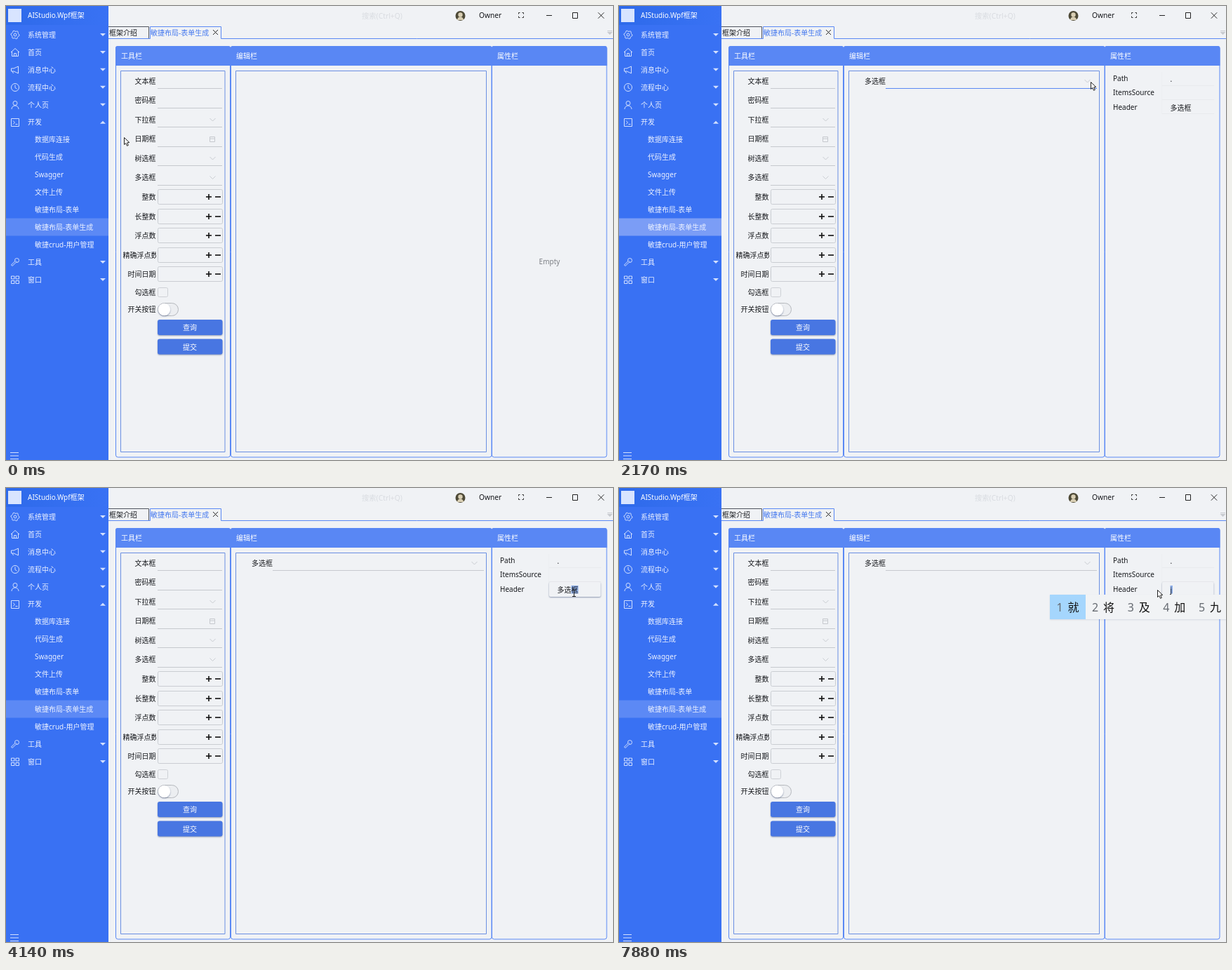
These frames come from a looping animation (865x647 px, 8000 ms). An HTML page with a canvas:

```html
<!DOCTYPE html>
<html lang="zh">
<head>
<meta charset="utf-8">
<title>表单生成</title>
<style>
html, body { margin: 0; width: 100%; height: 100%; overflow: hidden; background: #f0f2f5; }
canvas { display: block; }
</style>
</head>
<body>
<canvas id="stage" width="865" height="647"></canvas>
<script>
const g = document.getElementById('stage').getContext('2d');
const LOOP = 8000, STEP = 77.5;
const BG = '#f0f2f5', BLUE = '#5a88f4', FRAME = '#6a8fe2', PALE = '#d3e0fe', GREY = '#c6c9ce', INK = '#16181c';
const FAMILY = '"Noto Sans", "Noto Sans CJK SC", "Noto Sans CJK", sans-serif';

const clamp = (v, lo, hi) => Math.min(hi, Math.max(lo, v));
const within = (v, lo, hi) => v >= lo && v < hi;

function text(s, x, cy, color = INK, size = 10, align = 'left') {
  g.font = `${size}px ${FAMILY}`;
  g.textAlign = align;
  g.fillStyle = color;
  g.fillText(s, x, cy + size * 0.38);
}
function rect(x, y, w, h, color) {
  g.fillStyle = color;
  g.fillRect(x, y, w, h);
}
function paint(fill, stroke) {
  g.lineWidth = 1;
  if (fill) { g.fillStyle = fill; g.fill(); }
  if (stroke) { g.strokeStyle = stroke; g.stroke(); }
}
function poly(points, fill, stroke, close = true) {
  g.beginPath();
  points.forEach(([x, y]) => g.lineTo(x, y));
  if (close) g.closePath();
  paint(fill, stroke);
}
const path = (points, color) => poly(points, null, color, false);
const line = (x1, y1, x2, y2, color) => path([[x1, y1], [x2, y2]], color);
function round(x, y, w, h, r, fill, stroke) {
  g.beginPath();
  g.roundRect(x, y, w, h, r);
  paint(fill, stroke);
}
function arc(x, y, r, fill, stroke, from = 0) {
  g.beginPath();
  g.arc(x, y, r, from, Math.PI * 2);
  paint(fill, stroke);
}
function shadow(alpha, draw) {
  g.save();
  g.shadowColor = `rgba(20,40,90,${alpha})`;
  g.shadowBlur = 2;
  g.shadowOffsetY = 1;
  draw();
  g.restore();
}
function at(x, y, draw) {
  g.save();
  g.translate(x, y);
  draw();
  g.restore();
}
const triangle = (x, y, dir, color) => poly([[x - 4, y - 2 * dir], [x + 4, y - 2 * dir], [x, y + 2 * dir]], color);
const chevron = (x, y) => path([[x - 4, y - 2], [x, y + 2], [x + 4, y - 2]], '#c9ccd1');
function cross(x, y, r) {
  for (const k of [-r, r]) line(x - r, y - k, x + r, y + k, '#2a2a2a');
}

// Sidebar icons, drawn around their own centre
const icons = {
  gear() {
    const tooth = i => [i * Math.PI / 12, i % 4 < 2 ? 6 : 4.8];
    poly(Array.from({ length: 24 }, (_, i) => tooth(i)).map(([a, r]) => [r * Math.cos(a), r * Math.sin(a)]), null, PALE);
    arc(0, 0, 2, null, PALE);
  },
  home() {
    path([[-6, 0], [0, -5.5], [6, 0]], PALE);
    path([[-4.5, -1], [-4.5, 5.5], [4.5, 5.5], [4.5, -1]], PALE);
    round(-1.5, 1.5, 3, 4, 0, null, PALE);
  },
  horn() {
    poly([[-5.5, -2], [-2, -2], [4.5, -5], [4.5, 5], [-2, 2], [-5.5, 2]], null, PALE);
    line(-4, 2, -2.5, 5, PALE);
  },
  clock() {
    arc(0, 0, 5.5, null, PALE);
    path([[0, -3.5], [0, 0.5], [2.5, 2]], PALE);
  },
  person() {
    arc(0, -2.5, 3, null, PALE);
    arc(0, 6, 5, null, PALE, Math.PI);
  },
  terminal() {
    round(-5.5, -5.5, 11, 11, 0, null, PALE);
    path([[-3, -2.5], [-0.5, 0], [-3, 2.5]], PALE);
    line(0.5, 2.5, 3.5, 2.5, PALE);
  },
  wrench() {
    at(2.5, -2.5, () => arc(0, 0, 3, null, PALE));
    poly([[0.5, -2], [-5.5, 4], [-4, 5.5], [2, -0.5]], '#3971f3', PALE);
  },
  grid() {
    for (const x of [-5.5, 1]) for (const y of [-5, 1.5]) round(x, y, 4.5, 4, 0, null, PALE);
  }
};

const menu = [
  ['系统管理', 'gear'], ['首页', 'home'], ['消息中心', 'horn'], ['流程中心', 'clock'],
  ['个人页', 'person'], ['开发', 'terminal'], ['数据库连接'], ['代码生成'], ['Swagger'],
  ['文件上传'], ['敏捷布局-表单'], ['敏捷布局-表单生成'], ['敏捷crud-用户管理'],
  ['工具', 'wrench'], ['窗口', 'grid']
];

function sidebar(lit) {
  rect(0, 0, 146, 647, '#3971f3');
  const shade = g.createLinearGradient(0, 0, 146, 0);
  shade.addColorStop(0, '#2e6aea');
  shade.addColorStop(1, '#3972f4');
  rect(0, 0, 146, 27, shade);
  rect(3, 4, 19, 19, '#d8e4ff');
  text('AIStudio.Wpf框架', 31, 13.5, '#fff');
  rect(0, 302.5, 146, 25, lit ? '#7b9df6' : '#5c89f5');
  menu.forEach(([label, icon], i) => {
    const y = 41 + i * 24.93;
    text(label, icon ? 31 : 41, y, '#edf2ff');
    if (!icon) return;
    at(13, Math.round(y), icons[icon]);
    triangle(138, y, icon === 'terminal' ? -1 : 1, PALE);
  });
  for (let i = 0; i < 3; i++) line(6, 636.5 + i * 4.5, 18, 636.5 + i * 4.5, PALE);
}

function titleBar() {
  text('搜索(Ctrl+Q)', 507, 14, '#d9dce1', 10.3);
  arc(647.5, 14, 7, '#4d4936');
  arc(647.5, 12.5, 3.2, '#d9cfb4');
  arc(647.5, 20, 4.5, '#d9cfb4', null, Math.PI);
  text('Owner', 674, 13.5, INK, 10.2);
  for (const a of [-1, 1]) for (const b of [-1, 1])
    at(734 + a * 3.5, 13 + b * 3.5, () => path([[-2 * a, 0], [0, 0], [0, -2 * b]], '#333'));
  line(770, 13.5, 778, 13.5, '#222');
  round(807.5, 9.5, 7, 8, 0, null, '#222');
  cross(848, 13.5, 4.2);
}

function tabs() {
  path([[146, 29.5], [203.5, 29.5], [203.5, 46]], '#50555f');
  text('框架介绍', 147, 38);
  path([[146, 46.5], [205.5, 46.5], [205.5, 29.5], [306.5, 29.5], [306.5, 46.5], [865, 46.5]], BLUE);
  text('敏捷布局-表单生成', 206, 38, '#4478ee');
  cross(298.5, 37.5, 3.5);
  line(857, 35.5, 864, 35.5, GREY);
  triangle(860.5, 39, 1, GREY);
}

function panel(x, w, title, inset) {
  round(x + 0.5, 57.5, w - 1, 585.5, 3, null, BLUE);
  round(x, 57, w, 28, [3, 3, 0, 0], '#5987f4');
  text(title, x + 8, 71.5, '#fff');
  if (inset) round(x + 7.5, 92.5, w - 15.5, 543, 0, null, FRAME);
}

function button(label, y) {
  shadow(0.4, () => round(216, y, 92.5, 22, 3, '#4876e2'));
  text(label, 262, y + 11.5, '#fff', 10, 'center');
}

const label = (s, y) => text(s, 213.5, y, INK, 10, 'right');

function toolbox() {
  panel(156, 164, '工具栏', true);
  ['文本框', '密码框', '下拉框', '日期框', '树选框', '多选框'].forEach((name, i) => {
    const y = 107 + i * 27.5, base = Math.floor(y + 10.5) + 0.5;
    label(name, y);
    line(216, base, 308, base, GREY);
    if (name === '日期框') {
      round(290.5, 186.5, 7, 7, 0, null, GREY);
      line(290, 189, 298, 189, GREY);
    } else if (i > 1) chevron(294.5, y);
  });

  ['整数', '长整数', '浮点数', '精确浮点数', '时间日期'].forEach((name, i) => {
    const y = 272.5 + i * 27.5, my = Math.floor(y);
    const shown = g.measureText(name).width > 47;
    g.save();
    g.beginPath();
    g.rect(164, y - 8, 50, 16);
    g.clip();
    text(name, shown ? 166.5 : 213.5, y, INK, 10, shown ? 'left' : 'right');
    g.restore();
    round(216.5, my - 10.5, 92, 21, 2, null, '#cacdd2');
    for (const x of [285, 298]) rect(x, my - 0.8, 8, 1.6, '#111');
    rect(288.2, my - 4, 1.6, 8, '#111');
  });

  label('勾选框', 408);
  round(216.5, 401.5, 14, 13, 2, null, '#cdd0d5');
  label('开关按钮', 432.5);
  round(216.5, 423.5, 29, 18, 9, '#eceef1', '#b5b8bd');
  shadow(0.45, () => arc(225.5, 432.5, 8.7, '#fff'));
  button('查询', 447);
  button('提交', 474.5);
}

function editor({ t, x }) {
  panel(320, 372.5, '编辑栏', true);
  if (t < 1620) return;
  text('多选框', 350, 107.5);
  chevron(667.5, 107);
  line(380, 117.5, 681, 117.5, x < 684 ? BLUE : GREY);
}

const WORD = '多选框', LEFT = 785.5, RIGHT = LEFT + 10 * WORD.length;
const composing = t => t >= 7880;

// Letters are typed one by one, then deleted again
function content(t) {
  if (t < 6270) return WORD;
  const count = (from, gap) => clamp(Math.floor((t - from) / gap) + 1, 0, 4);
  return 'jian'.slice(0, count(6270, 126) - count(6950, 153) + composing(t));
}

// Dragging selects whole characters right of the pointer
function selection({ t, x }) {
  if (composing(t)) return [LEFT, LEFT + 3.5];
  if (!within(t, 4140, 6270)) return [RIGHT, RIGHT];
  return [LEFT + 10 * clamp(Math.floor((x - LEFT) / 10), 0, WORD.length), RIGHT];
}

function properties(s) {
  panel(692, 164.5, '属性栏');
  if (s.t < 1860) {
    text('Empty', 774.5, 364, '#7c7f84', 10, 'center');
    return;
  }
  ['Path', 'ItemsSource', 'Header'].forEach((name, i) => {
    text(name, 704, 103 + i * 20.4);
    line(774, 113.5 + i * 20, 848, 113.5 + i * 20, '#e9ebee');
  });
  line(773.5, 94, 773.5, 154, '#eceef1');
  text('.', LEFT, 104.5);
  if (s.t >= 3660) shadow(0.45, () => round(774, 134, 73.5, 21, 2, BG));
  const [from, to] = selection(s);
  rect(from, 139, to - from, 11.5, '#8fb0ea');
  text(content(s.t), LEFT, 145.5);
}

function candidates() {
  shadow(0.12, () => rect(614, 152, 260, 35, '#f1f3f5'));
  rect(614, 152, 51, 35, '#a5d6fd');
  [...'就将及加九'].forEach((c, i) => {
    const x = 623.5 + i * 50.6;
    text(i + 1, x, 170, '#666b72', 16);
    text(c, x + 16, 170, '#111', 16);
  });
}

// Pointer key points: time, x, y
const route = [
  [0, 168, 187], [800, 200, 242], [930, 267, 207], [1170, 357, 138], [1390, 373, 131], [1780, 373, 131],
  [2170, 672, 108], [3255, 783, 108], [3600, 811, 138], [4140, 809, 151], [4600, 819, 147],
  [5100, 819, 147], [5230, 801, 146], [5400, 800, 146], [5470, 767, 145], [LOOP, 767, 145]
];

function pointerAt(t) {
  const i = route.findIndex(k => k[0] > t);
  const [t0, x0, y0] = route[i - 1], [t1, x1, y1] = route[i], f = (t - t0) / (t1 - t0);
  return { x: x0 + (x1 - x0) * f, y: y0 + (y1 - y0) * f };
}

const carrying = t => within(t, 830, 1600);
const pressed = t => carrying(t) || within(t, 4040, 4130) || within(t, 4770, 5700);

function pointer({ t, x, y }) {
  if (pressed(t)) arc(x, y, 9.7, 'rgba(255,238,0,.7)');
  at(Math.round(x), Math.round(y), () => {
    if (x > 774 && y > 133) {
      line(0.5, -5, 0.5, 5, '#222');
      for (const end of [-4.5, 4.5]) line(-2, end, 3, end, '#222');
      return;
    }
    poly([[0.5, 0.5], [0.5, 10.5], [2.8, 8.5], [4.5, 12.3], [6.3, 11.5], [4.7, 7.8], [7.8, 7.5]], '#fff', '#222');
    if (carrying(t)) round(1.5, 10.5, 8, 5, 0, '#fff', '#333');
  });
}

const start = performance.now();
function draw() {
  const t = (performance.now() - start) % LOOP;
  const s = { t, ...pointerAt(Math.floor(t / STEP) * STEP) };
  rect(0, 0, 865, 647, BG);
  titleBar();
  tabs();
  sidebar(within(t, 770, 3660));
  toolbox();
  editor(s);
  properties(s);
  if (composing(t)) candidates();
  pointer(s);
  requestAnimationFrame(draw);
}
draw();
</script>
</body>
</html>
```
